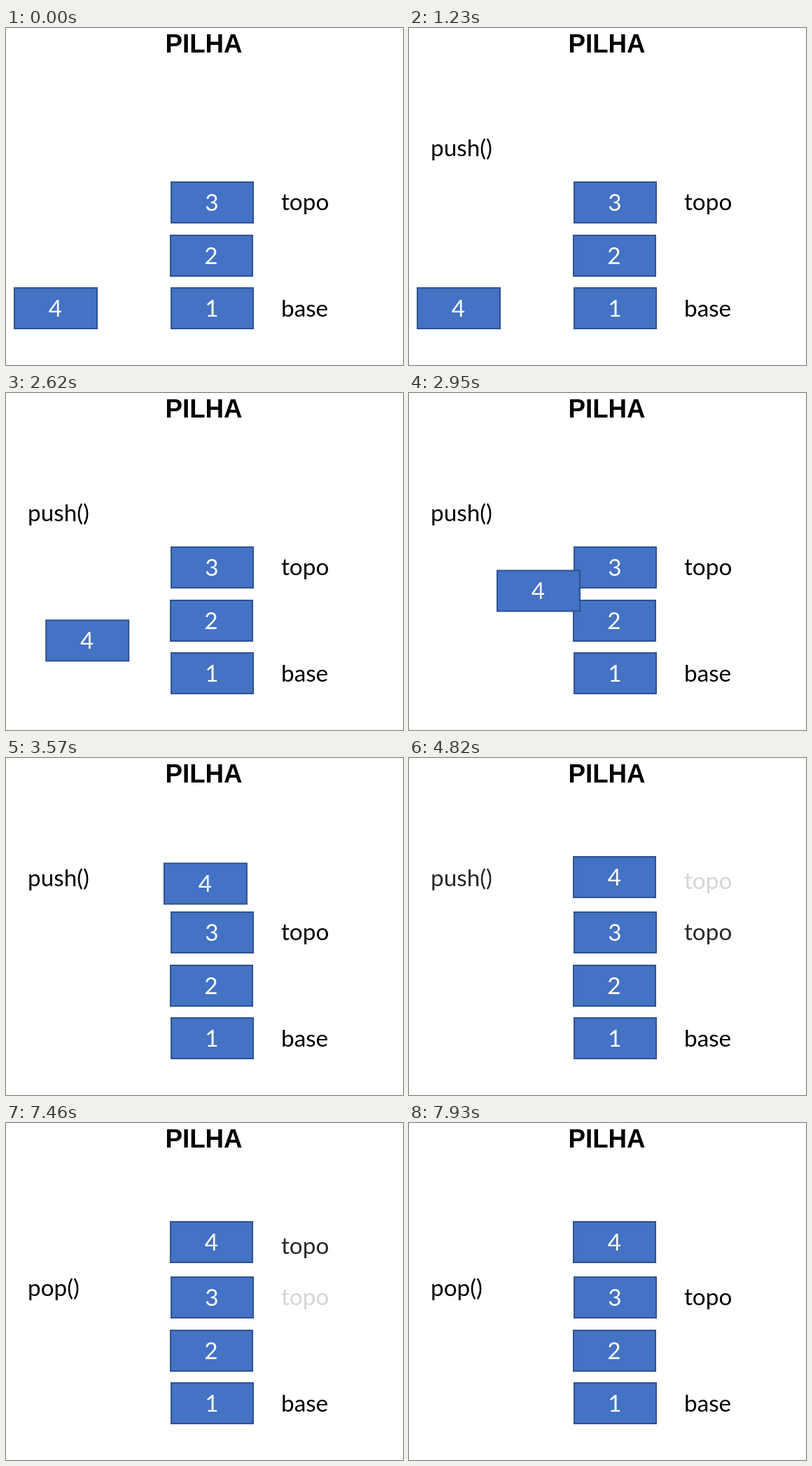
Write an HTML page that moves like this. It is 567 by 481 pixels and loops after 8 s.

```html
<!DOCTYPE html>
<html lang="pt">
<head>
<meta charset="utf-8">
<style>
html, body { margin: 0; width: 100%; height: 100%; overflow: hidden; background: #fff; }
svg { display: block; }
text { font: 33.3px Lato, Carlito, sans-serif; }
.title { font: bold 36.67px "Liberation Sans", Arial, sans-serif; }
rect { fill: #4472c4; stroke: #2f528f; stroke-width: 2; }
g text { fill: #fff; text-anchor: middle; }
</style>
</head>
<body>
<svg width="567" height="481" viewBox="0 0 567 481">
  <text class="title" x="227.5" y="35">PILHA</text>
  <text id="push" x="31" y="183">push()</text>
  <text id="pop" x="31" y="247">pop()</text>
  <text id="topHigh" x="393" y="187">topo</text>
  <text id="topLow" x="393" y="260">topo</text>
  <text x="393" y="412">base</text>
  <g transform="translate(235 370)"><rect x="1" y="1" width="117" height="58"/><text x="59" y="42">1</text></g>
  <g transform="translate(234 295)"><rect x="1" y="1" width="117" height="58"/><text x="59" y="42">2</text></g>
  <g transform="translate(235 219)"><rect x="1" y="1" width="117" height="58"/><text x="59" y="42">3</text></g>
  <g id="box"><rect x="1" y="1" width="118" height="58"/><text x="59.5" y="42">4</text></g>
</svg>
<script>
const LOOP = 8000, STEP = 156, FADE = 500, MOVE = 2000;
const $ = id => document.getElementById(id);
const box = $('box'), boxRect = box.querySelector('rect');

// Progress 0..1, advancing in held steps from the first visible change;
// lead is how far the motion has already run at that moment.
function progress(t, first, lead, duration) {
  if (t < first) return 0;
  const held = Math.floor((t - first) / STEP) * STEP;
  return Math.min(1, (held + lead) / duration);
}

const ease = u => u < .5 ? (2 * u) ** 2.5 / 2 : 1 - (2 - 2 * u) ** 2.5 / 2;
const show = (id, alpha) => $(id).setAttribute('opacity', alpha);

function draw(t) {
  const pushIn = progress(t, 750, 90, FADE);
  const rise = progress(t, 1990, 73, MOVE);
  const swap = progress(t, 4820, 80, FADE);
  const popIn = progress(t, 6210, 140, FADE);
  const back = progress(t, 7460, 80, FADE);

  show('push', pushIn - swap);
  show('pop', popIn);
  show('topHigh', swap - back);
  show('topLow', 1 - swap + back);

  const k = ease(rise);
  box.setAttribute('transform', `translate(${11 + 223 * k} ${370 - 230 * k})`);
  boxRect.setAttribute('width', rise < 1 ? 118 : 117);
}

function tick() {
  draw(performance.now() % LOOP);
  requestAnimationFrame(tick);
}
tick();
</script>
</body>
</html>
```
